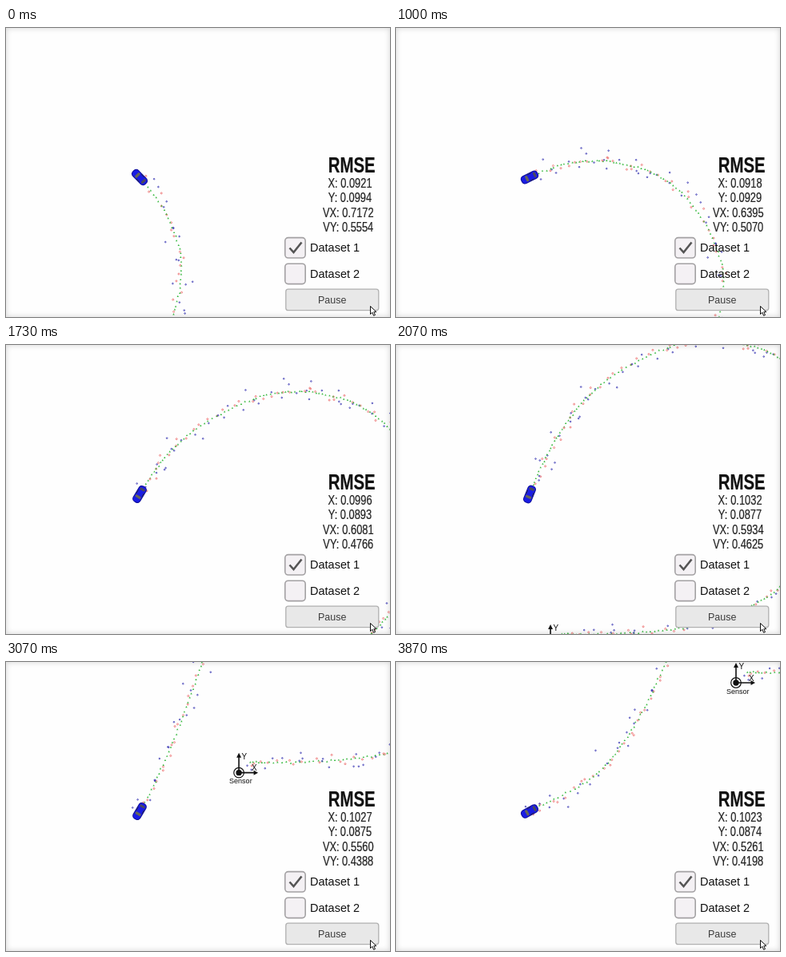
Write an HTML page with a canvas that moves like this. It is 480 by 362 pixels and loops after 3.99 s.

```html
<!DOCTYPE html>
<html lang="en">
<head>
<meta charset="utf-8">
<title>Tracking simulator</title>
<style>
  html, body { margin: 0; width: 100%; height: 100%; overflow: hidden; background: #fefefe; }
  canvas, svg, .edge { position: absolute; left: 0; top: 0; width: 480px; height: 362px; }
  .edge { box-shadow: inset 0 0 6px 1px rgba(0, 0, 0, .14); }
  text { font-family: "Liberation Sans", Arial, sans-serif; }
  .stats { font-size: 17.4px; text-anchor: middle; fill: #222; stroke: #222; stroke-width: .25px; }
  .title { font-size: 27.6px; font-weight: bold; fill: #111; }
  .label { font-size: 14.5px; fill: #111; }
  .box { fill: #f4f1f4; stroke: #a3a1a3; stroke-width: 1.6; }
</style>
</head>
<body>
<canvas id="world" width="480" height="362"></canvas>
<svg viewBox="0 0 480 362">
  <g class="stats" transform="translate(430 0) scale(.74 1)">
    <text class="title" x="3" y="181">RMSE</text>
    <text class="stat" y="200"></text>
    <text class="stat" y="218"></text>
    <text class="stat" x="-3" y="237.5"></text>
    <text class="stat" x="-3" y="255.5"></text>
  </g>
  <rect class="box" x="348.8" y="262.6" width="25.4" height="25.4" rx="4"/>
  <rect class="box" x="348.8" y="295.2" width="25.4" height="25.4" rx="4"/>
  <path d="M354.5 275.5l5 5.5 10-12.5" fill="none" stroke="#555" stroke-width="2.6"/>
  <text class="label" x="380" y="280">Dataset 1</text>
  <text class="label" x="380" y="312.5">Dataset 2</text>
  <rect x="349.8" y="327.2" width="116" height="26.5" rx="3" fill="#e8e8e8" stroke="#b0b0b0" stroke-width="1.3"/>
  <text x="407.7" y="344.7" font-size="12.5" text-anchor="middle" fill="#3c3c3c">Pause</text>
  <path d="M455.5 348.5v10l2.400-2.200 1.700 4 1.900-.8-1.700-3.800h3.200z" fill="#fff" stroke="#111"/>
</svg>
<div class="edge"></div>
<script>
const LOOP = 3990, FPS = 15;
const LEG = 430, START = 6; // ms per route leg, leg on which the loop starts
const CAR = { x: 167, y: 187 };

// Key points of the drive relative to the sensor, evenly spaced in time
const ROUTE = [
  [15, -13], [110, -15], [205, -29], [287, -72], [343, -145],
  [361, -246], [310, -341], [233, -378], [150, -373], [59, -322],
  [5, -254], [-33, -171], [-72, -65], [-117, 36], [-174, 114], [-258, 161]
];
const LAST = ROUTE.length - 1;

// Error readings at a few key times
const TIMES = [0, 600, 2070, 3870];
const ERRORS = {
  X: [.0921, .0875, .1032, .1023],
  Y: [.0994, .0948, .0877, .0874],
  VX: [.7172, .6568, .5934, .5261],
  VY: [.5554, .5236, .4625, .4198]
};

const ctx = document.getElementById('world').getContext('2d');
const labels = document.querySelectorAll('.stat');
const clamp = (v, lo, hi) => Math.min(Math.max(v, lo), hi);

function spline(a, b, c, d, k) {
  return b + k / 2 * (c - a + k * (2 * a - 5 * b + 4 * c - d + k * (3 * (b - c) + d - a)));
}

function routeAt(u) {
  const i = clamp(Math.floor(u), 0, LAST - 1);
  const p = [-1, 0, 1, 2].map(o => ROUTE[clamp(i + o, 0, LAST)]);
  const [x, y] = [0, 1].map(n => spline(...p.map(q => q[n]), u - i));
  return { x, y };
}

let seed = 20;
function random() {
  seed = (seed * 16807) % 2147483647;
  return seed / 2147483647;
}
const noise = size => (random() + random() + random() - 1.5) * 2 * size;

// Estimates lie on the route; lidar and radar readings alternate around it
const dots = [];
const PER_LEG = 19;
for (let i = 0; i < LAST * PER_LEG; i++) {
  const u = i / PER_LEG, p = routeAt(u), radar = i % 2 === 1;
  const spread = radar ? 7.5 : 3;
  dots.push({
    u, radar,
    x: p.x + noise(.5), y: p.y + noise(.5),
    mx: p.x + noise(spread), my: p.y + noise(spread)
  });
}

function circle(x, y, r) {
  ctx.beginPath();
  ctx.arc(x, y, r, 0, 7);
}

function polygon(...points) {
  ctx.beginPath();
  points.forEach(p => ctx.lineTo(...p));
}

function drawTrail(u) {
  ctx.lineWidth = .9;
  ctx.fillStyle = '#35b83c';
  for (const d of dots) {
    if (d.u > u) break;
    ctx.strokeStyle = d.radar ? '#3a38b4' : '#ee7474';
    circle(d.mx, d.my, d.radar ? .8 : 1);
    ctx.stroke();
    polygon([d.x, d.y - 1.2], [d.x + 1.2, d.y + 1], [d.x - 1.2, d.y + 1]);
    ctx.fill();
  }
}

function drawSensor() {
  ctx.strokeStyle = ctx.fillStyle = '#111';
  ctx.lineWidth = 1.2;
  circle(0, 0, 6.3);
  ctx.stroke();
  circle(0, 0, 3.7);
  ctx.fill();
  ctx.lineWidth = 1.6;
  polygon([0, -20], [0, 0], [20, 0]);
  ctx.stroke();
  polygon([0, -25], [3, -19], [-3, -19]);
  ctx.fill();
  polygon([24, 0], [18.5, 3], [18.5, -3]);
  ctx.fill();
  ctx.font = '10px "Liberation Sans", Arial, sans-serif';
  ctx.fillText('Y', 3.5, -17);
  ctx.fillText('X', 16, -2.5);
  ctx.font = '9px "Liberation Sans", Arial, sans-serif';
  ctx.fillText('Sensor', -12, 13.5);
}

function roundBox(x, y, w, h, r, color) {
  ctx.fillStyle = color;
  ctx.beginPath();
  ctx.roundRect(x, y, w, h, r);
  ctx.fill();
}

function drawCar(angle) {
  ctx.save();
  ctx.translate(CAR.x, CAR.y);
  ctx.rotate(angle);
  roundBox(-11.5, -5.5, 23, 11, 4.5, '#10109a');
  roundBox(-10.5, -4.5, 21, 9, 3.8, '#1a1ce4');
  roundBox(-8.5, -3.5, 3, 7, 1.5, '#4a4a5c');
  roundBox(2, -3.8, 3.3, 7.6, 1.5, '#66665a');
  roundBox(-4, -4.8, 5.5, 1.2, .5, '#22226a');
  roundBox(-4, 3.6, 5.5, 1.2, .5, '#22226a');
  ctx.restore();
}

function errorAt(values, t) {
  const i = clamp(TIMES.findLastIndex(v => v <= t), 0, TIMES.length - 2);
  const k = (t - TIMES[i]) / (TIMES[i + 1] - TIMES[i]);
  return values[i] + (values[i + 1] - values[i]) * k;
}

function draw(t) {
  const u = START + t / LEG;
  const pos = routeAt(u), back = routeAt(u - .04), ahead = routeAt(u + .04);

  ctx.clearRect(0, 0, 480, 362);
  ctx.save();
  ctx.translate(CAR.x - pos.x, CAR.y - pos.y);
  drawTrail(u);
  drawSensor();
  ctx.restore();
  drawCar(Math.atan2(ahead.y - back.y, ahead.x - back.x));

  Object.entries(ERRORS).forEach(([name, values], i) => {
    labels[i].textContent = `${name}: ${errorAt(values, t).toFixed(4)}`;
  });
}

const beat = step => Math.floor((step - .2) / 5.27);
const skipped = step => beat(step) !== beat(step - 1);

let shown = -1;
function tick() {
  let step = Math.floor((performance.now() % LOOP + 4) * FPS / 1000);
  if (skipped(step)) step--;
  if (step !== shown) {
    shown = step;
    draw(Math.round(step * 100 / FPS) * 10);
  }
  requestAnimationFrame(tick);
}
tick();
</script>
</body>
</html>
```
